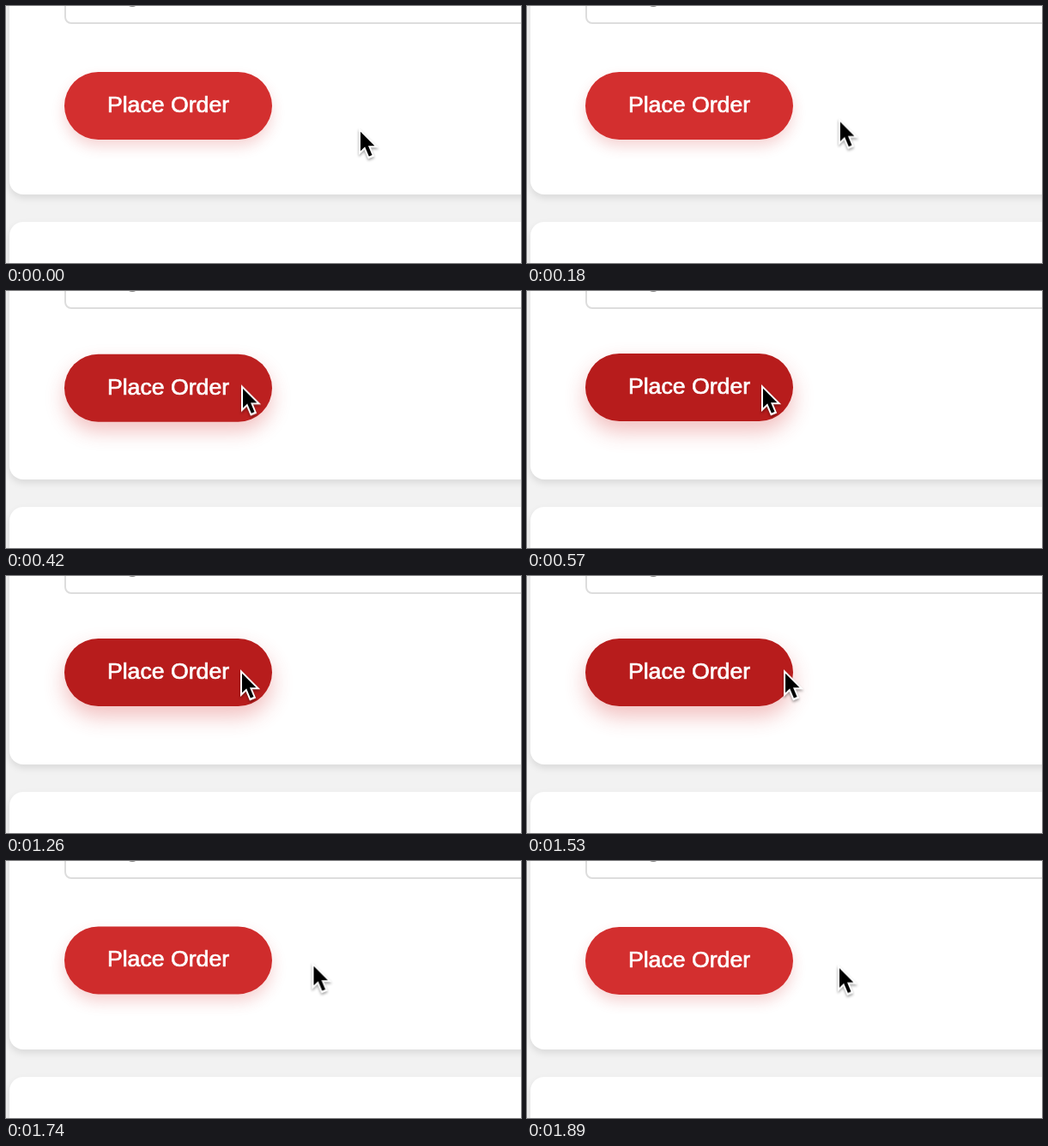
An HTML page for the animation above (1920 ms loop, 600 by 300 pixels).

```html
<!DOCTYPE html>
<html lang="en">
<head>
<meta charset="utf-8">
<title>Place Order button</title>
<style>
  html, body { margin: 0; width: 100%; height: 100%; overflow: hidden; background: #f2f2f2; }
  #stage { position: relative; width: 600px; height: 300px; overflow: hidden;
           font: 26.667px "Liberation Sans", Arial, sans-serif; }
  #stage > * { position: absolute; box-sizing: border-box; }
  .card { left: 4px; width: 640px; height: 300px; border-radius: 16px; background: #fff;
          box-shadow: 0 4px 8px rgba(0, 0, 0, .1); }
  .upper { top: -80px; }
  .lower { top: 252px; }
  .field { left: 68px; top: -60px; width: 560px; height: 81px; border: 2px solid #ddd; border-radius: 8px; }
  .hint { left: 140px; top: -28px; line-height: 30px; color: #888; }
  .button { left: 68px; top: 77px; width: 242px; height: 79px; border-radius: 40px;
            color: #fff; line-height: 77px; text-align: center; white-space: nowrap;
            -webkit-text-stroke: .7px #fff; }
  .cursor { left: 0; top: 0; width: 40px; height: 50px; overflow: visible;
            filter: drop-shadow(0 2px 1.5px rgba(0, 0, 0, .35)); }
</style>
</head>
<body>
<div id="stage">
  <div class="card upper"></div>
  <div class="card lower"></div>
  <div class="field"></div>
  <div class="hint">g</div>
  <div class="button">Place Order</div>
  <svg class="cursor">
    <g transform="scale(2) translate(-8.2 -4.9)">
      <g fill="#fff">
        <path d="M8.2 20.9V4.9L19.8 16.5H13L12.6 16.6Z"/>
        <path d="M17.3 21.6L13.7 23.1L9 12L12.7 10.5Z"/>
      </g>
      <path d="M9.2 7.3V18.5L12.2 15.6L12.6 15.5H17.4Z"/>
      <rect x="12.5" y="13.6" width="2" height="8" transform="rotate(-22.8 13.5 17.6)"/>
    </g>
  </svg>
</div>
<script>
  const LOOP = 1920;

  // Moves from a to b during the enter span, and on to c during the leave span.
  function play(selector, [a, b, c], enter, leave) {
    const key = (time, state, easing = 'linear') => ({ ...state, offset: time / LOOP, easing });
    document.querySelector(selector).animate([
      key(0, a), key(enter.from, a, enter.easing), key(enter.to, b),
      key(leave.from, b, leave.easing), key(leave.to, c), key(LOOP, c)
    ], { duration: LOOP, iterations: Infinity });
  }
  const span = (from, to, easing) => ({ from, to, easing });

  // Pointer: horizontal travel and height ease separately, so it dips only on the way out.
  const approach = span(0, 460, 'cubic-bezier(.5, 0, .4, 1)');
  const across = x => ({ translate: `${x}px` });
  const down = y => ({ transform: `translateY(${y}px)` });
  play('.cursor', [411, 273, 362].map(across), approach, span(1260, 1850, 'cubic-bezier(.65, 0, .51, 1)'));
  play('.cursor', [142, 109, 120.5].map(down), approach, span(1620, 1800, 'ease-in-out'));

  const rest = {
    transform: 'translateY(0px)', backgroundColor: '#d32f2f',
    boxShadow: '0 8px 16px rgba(211, 47, 47, .2)'
  };
  const hover = {
    transform: 'translateY(-4px)', backgroundColor: '#b71c1c',
    boxShadow: '0 12px 24px rgba(211, 47, 47, .3)'
  };
  play('.button', [rest, hover, rest], span(270, 570, 'ease'), span(1577, 1877, 'ease'));
</script>
</body>
</html>
```
